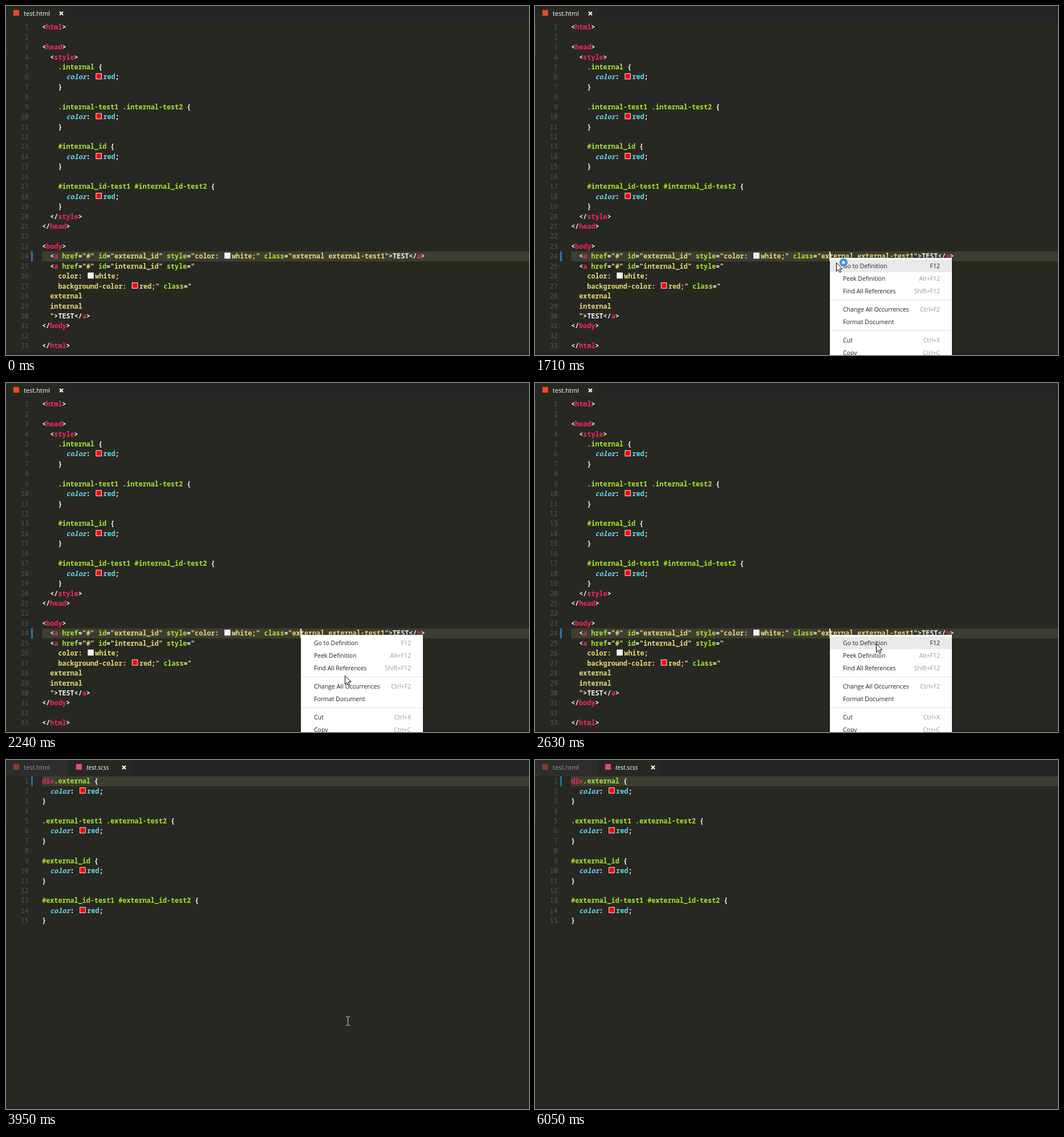
These frames come from a looping animation (917x611 px, 6.43 s). An HTML page with a canvas:

```html
<!DOCTYPE html>
<html lang="en">
<head>
<meta charset="utf-8">
<title>Go to Definition</title>
<style>
  html, body { margin: 0; width: 100%; height: 100%; overflow: hidden; background: #272822; }
  canvas { display: block; }
</style>
</head>
<body>
<canvas id="stage" width="917" height="611"></canvas>
<script>
const ctx = document.getElementById('stage').getContext('2d');
const LOOP = 6430, LEFT = 63.2, TOP = 28.5, LINE = 17.44, CHAR = 7.05;
const MONO = '11.75px "Noto Sans Mono", monospace', CODE = '600 ' + MONO;
const UI = '"Open Sans", sans-serif';

// Code markup: ^ plus a letter sets the style, ^1 and ^2 are colour swatches.
const STYLES = { w: '#f8f8f2', r: '#f92660', g: '#a6e82e', y: '#e9dc74', c: '#66d9ef', i: '#66d9ef' };
const SWATCHES = { 1: '#ff0000', 2: '#f2f2f2' };
const tag = (name, slash = '') => `^w<${slash}^r${name}^w>`;
const attr = (name, value) => `^g${name}^w=^y${value}`;
const rule = (selector, pad = '') =>
  [`${pad}^g${selector} ^w{`, `${pad}  ^icolor^w: ^1^cred^w;`, `${pad}^w}`];
const link = id => `  ^w<^ra ${attr('href', '"#"')} ${attr('id', `"${id}"`)} `;
const linkEnd = '^w>TEST' + tag('a', '/');

const htmlLines = [
  tag('html'), '', tag('head'), '  ' + tag('style'),
  ...rule('.internal', '    '), '',
  ...rule('.internal-test1 .internal-test2', '    '), '',
  ...rule('#internal_id', '    '), '',
  ...rule('#internal_id-test1 #internal_id-test2', '    '),
  '  ' + tag('style', '/'), tag('head', '/'), '', tag('body'),
  link('external_id') + attr('style', '"color: ^2white;" ') +
    attr('class', '"external external-test1"') + linkEnd,
  link('internal_id') + attr('style', '"'),
  '    ^ycolor: ^2white;',
  '    ^ybackground-color: ^1red;" ' + attr('class', '"'),
  '  ^yexternal', '  ^yinternal', '  ^y"' + linkEnd,
  tag('body', '/'), '', tag('html', '/')
];
const scssLines = [
  ...rule('.external').map((line, i) => i ? line : '^rdiv' + line), '',
  ...rule('.external-test1 .external-test2'), '',
  ...rule('#external_id'), '',
  ...rule('#external_id-test1 #external_id-test2')
];

const menuItems = [
  [455, 'Go to Definition', 'F12'], [477, 'Peek Definition', 'Alt+F12'],
  [499, 'Find All References', 'Shift+F12'], [531, 'Change All Occurrences', 'Ctrl+F2'],
  [553, 'Format Document', ''], [585, 'Cut', 'Ctrl+X'], [607, 'Copy', 'Ctrl+C']
];

// Mouse moves: start, end, number of steps, points along the way.
const moves = [
  [70, 610, 8, [[740, 566], [640, 512], [560, 464], [521, 443], [517, 441]]],
  [1710, 2310, 9, [[528, 449], [556, 464], [582, 476], [592, 481], [592, 482], [592, 484], [593, 494], [594, 512], [595, 548]]],
  [2400, 2630, 4, [[597, 520], [598, 486], [598, 464], [598, 456]]],
  [4950, 5330, 6, [[612, 470], [660, 520], [700, 553], [702, 555], [697, 555]]],
  [5640, 5641, 2, [[695, 555], [695, 555]]],
  [5890, 5970, 2, [[740, 572], [803, 592]]]
];

function mouseAt(t) {
  const [start, end, steps, points] = moves.filter(m => m[0] <= t).pop();
  const progress = Math.min(1, (t - start) / (end - start));
  const at = Math.floor(progress * (steps - 1) + 0.001) / (steps - 1) * (points.length - 1);
  const i = Math.min(Math.floor(at), points.length - 2);
  return points[i].map((v, axis) => v + (points[i + 1][axis] - v) * (at - i));
}

function rect(x, y, w, h, color) {
  ctx.fillStyle = color;
  ctx.fillRect(x, y, w, h);
}

function text(str, x, y, color, font, align = 'left') {
  ctx.font = font;
  ctx.fillStyle = color;
  ctx.textAlign = align;
  ctx.fillText(str, x, y);
}

function codeLine(markup, y, swatches) {
  let x = LEFT, style = 'w';
  for (const part of markup.split(/(\^.)/)) {
    if (part[0] !== '^') {
      text(part, x, Math.round(y), STYLES[style], (style === 'i' ? 'italic ' : '') + CODE);
      x += part.length * CHAR;
    } else if (STYLES[part[1]]) {
      style = part[1];
    } else if (swatches) {
      rect(x + 2.5, y - 10.6, 10.6, 10.6, '#eeeeee');
      rect(x + 3.5, y - 9.6, 8.6, 8.6, SWATCHES[part[1]]);
      x += 15.6;
    }
  }
}

function editor(lines, current, bar, swatches) {
  const y = TOP + LINE * (current - 1);
  rect(LEFT, y, 917, LINE, '#3e3d32');
  if (bar) rect(44, y, 3, LINE, bar);
  lines.forEach((line, i) => {
    const base = TOP + LINE * i + 12.7;
    text(i + 1, 39.8, Math.round(base), '#55564f', MONO, 'right');
    codeLine(line, base, swatches);
  });
}

function tab(x, w, name, icon, active, italic = '') {
  rect(x, 0, w, 28, active ? '#272822' : '#2d2d2d');
  ctx.globalAlpha = active ? 1 : 0.5;
  rect(x + 13, 7, 10, 10, icon);
  text(name, x + 31, 17, '#ffffff', `${italic} 500 11.1px ${UI}`);
  ctx.globalAlpha = 1;
  if (!active) return;
  const cx = x + 97, r = 3;
  ctx.strokeStyle = '#ffffff';
  ctx.lineWidth = 2;
  ctx.beginPath();
  ctx.moveTo(cx - r, 13 - r); ctx.lineTo(cx + r, 13 + r);
  ctx.moveTo(cx + r, 13 - r); ctx.lineTo(cx - r, 13 + r);
  ctx.stroke();
}

function menu(mouseY) {
  ctx.shadowColor = 'rgba(0,0,0,.5)';
  ctx.shadowBlur = 3;
  rect(517, 441, 214, 180, '#ffffff');
  ctx.shadowBlur = 0;
  for (const y of [514, 568]) rect(517, y, 214, 1, '#e2e2e2');
  for (const [y, label, keys] of menuItems) {
    const hover = mouseY > 442 && Math.abs(mouseY - y) < 11;
    if (hover) rect(517, y - 11, 214, 22, '#e9e9e9');
    text(label, 540, y + 4, '#222222', `10.5px ${UI}`);
    text(keys, 710, y + 4, hover ? '#222222' : '#999999', `10.5px ${UI}`, 'right');
  }
}

function arrow(x, y) {
  ctx.beginPath();
  for (const [dx, dy] of [[0, 0], [0, 15], [3.4, 11.8], [5.8, 17], [8, 16], [5.7, 10.9], [10.4, 10.9]])
    ctx.lineTo(x + dx, y + dy);
  ctx.closePath();
  ctx.fillStyle = '#ffffff';
  ctx.fill();
  ctx.strokeStyle = '#000000';
  ctx.lineWidth = 1;
  ctx.stroke();
}

function busyRing(x, y) {
  for (const [width, color] of [[4, '#1f78c8'], [2, '#45a9ee']]) {
    ctx.beginPath();
    ctx.arc(x, y, 5, 0, 7);
    ctx.lineWidth = width;
    ctx.strokeStyle = color;
    ctx.stroke();
  }
}

function iBeam(x, y) {
  x = Math.round(x + 1);
  y = Math.round(y);
  rect(x, y - 6, 1, 14, '#d8d8d4');
  for (const end of [y - 7, y + 8]) {
    rect(x - 3, end, 3, 1, '#d8d8d4');
    rect(x + 1, end, 3, 1, '#d8d8d4');
  }
}

function draw(t) {
  const opened = t >= 3410;
  rect(0, 0, 917, 611, '#272822');
  rect(0, 0, 917, 28, '#252526');
  rect(0, 609, 917, 2, '#20211d');
  rect(0, opened ? 70 : 28, 1, opened ? 38 : 60, '#3a3b3a');
  tab(0, 110, 'test.html', '#e44d26', !opened);
  if (opened) tab(110, 110, 'test.scss', '#e8467c', true, 'italic');

  if (!opened) editor(htmlLines, 24, '#3072bd', true);
  else if (t >= 3480) editor(scssLines, 1, t >= 3950 && '#0c7d9d', t >= 3880);

  if (t >= 920 && !opened) rect(516, 430, 2, 17, '#f8f8f0');
  if (t >= 5330 && t < 5890) rect(63, 29, 2, 17, '#f8f8f0');

  if (t < 70 || t >= 6050) return;
  const [x, y] = mouseAt(t);
  if (t >= 1460 && t < 3340) menu(y);
  if (t < 1460 || t >= 3640) {
    iBeam(x, y);
  } else {
    arrow(x + 0.5, y + 0.5);
    if (t < 2160) busyRing(x + 13, y);
  }
}

function frame() {
  draw(performance.now() % LOOP);
  requestAnimationFrame(frame);
}
frame();
</script>
</body>
</html>
```
